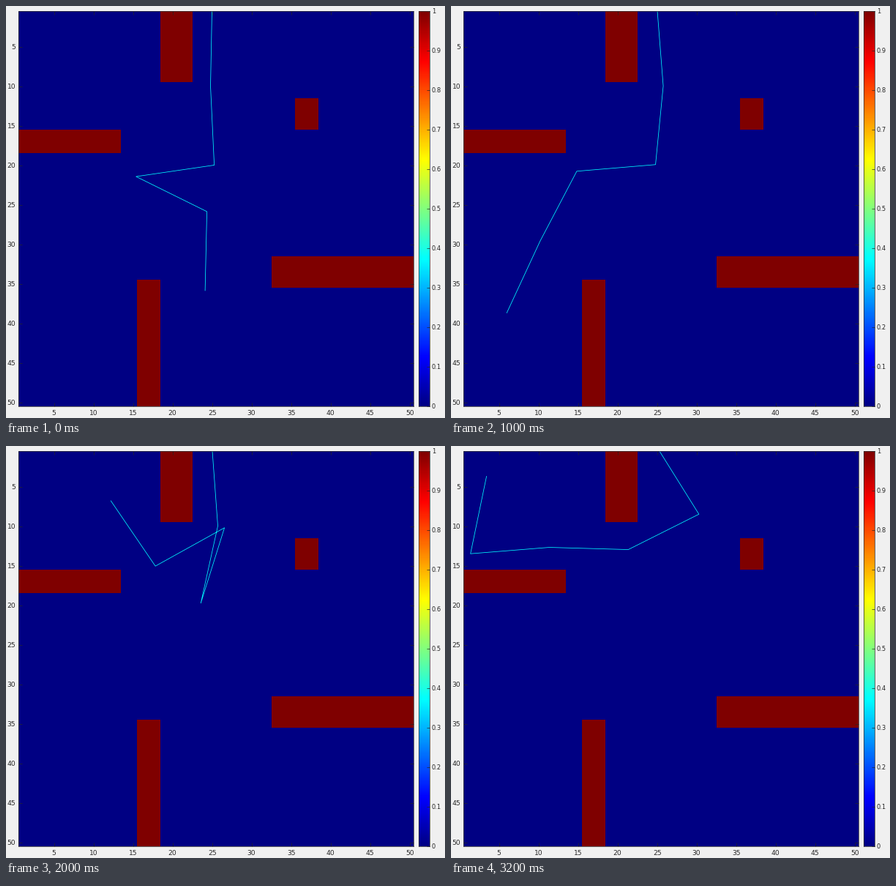
Recreate the animation shown at these times as a matplotlib script. Size 600 by 563 pixels, loop 4.8 s.

```python
import numpy as np
import matplotlib.pyplot as plt
from matplotlib.animation import FuncAnimation
from matplotlib.colors import ListedColormap

W, H, DPI = 600, 563, 100
FRAMES, INTERVAL = 48, 100
INK = "#262626"
LINK, BASE = 10, (25, 0)
PAUSES = (7, 30)

# heading of each link, in degrees from straight down, at a given step
POSES = {
    0: (-1.1, 2.7, -81.7, 63.7, -1.3),
    4: (60.9, -13.4, -89.5, 15.8, -10.7),
    9: (4.5, -5.6, -85.2, -27.7, -24.9),
    17: (25.5, 8.5, -206, -33.2, -135.6),
    22: (-7.8, -24.2, -192.6, -76.6, -151.4),
    26: (-7.5, -27.6, -124.8, -104.4, -208.8),
    30: (32, -63.4, -91.6, -85.4, -191.7),
}
STEPS = list(POSES)

# first column, last column, first row, last row
WALLS = [(19, 22, 1, 9), (1, 13, 16, 18), (36, 38, 12, 15),
         (33, 50, 32, 35), (16, 18, 35, 50)]


def jet(n=256):
    x = np.arange(1, n + 1) / n
    return np.clip([1.5 - abs(4 * x - c) for c in (3, 2, 1)], 0, 1).T


def pixel_axes(left, top, width, height):
    ax = fig.add_axes([left / W, 1 - (top + height) / H, width / W, height / H])
    for spine in ax.spines.values():
        spine.set(color=INK, linewidth=0.5)
    return ax


def ease_out(t):
    return 1 - (1 - t) ** 2


def headings(frame):
    step = min(frame - sum(frame >= p for p in PAUSES), STEPS[-1])
    i = min(np.searchsorted(STEPS, step, side="right"), len(STEPS) - 1)
    start, end = STEPS[i - 1], STEPS[i]
    a, b = np.radians(POSES[start]), np.radians(POSES[end])
    return a + (b - a) * ease_out((step - start) / (end - start))


def arm(frame):
    angles = headings(frame)
    x = BASE[0] + LINK * np.cumsum(np.r_[0, np.sin(angles)])
    y = BASE[1] + LINK * np.cumsum(np.r_[0, np.cos(angles)])
    return x, y


plt.rcParams["font.family"] = "DejaVu Sans"
fig = plt.figure(figsize=(W / DPI, H / DPI), dpi=DPI, facecolor="#f0f0f0")
cmap = ListedColormap(jet())

grid = np.zeros((50, 50))
for c0, c1, r0, r1 in WALLS:
    grid[r0 - 1:r1, c0 - 1:c1] = 1

ax = pixel_axes(17, 7, 540, 540)
ax.imshow(grid, cmap=cmap, vmin=0, vmax=1, extent=(0.5, 50.5, 50.5, 0.5),
          aspect="auto", interpolation="nearest")
line, = ax.plot([], [], color="cyan", lw=0.55)
ticks = range(5, 51, 5)
ax.set(xlim=(0.5, 50.5), ylim=(50.5, 0.5), xticks=ticks, yticks=ticks)
ax.tick_params(direction="in", top=True, right=True, length=3.9, width=0.5,
               color=INK, labelcolor=INK, labelsize=6.6)
ax.tick_params(axis="x", pad=3.4)
ax.tick_params(axis="y", pad=2.7)

bar = pixel_axes(564, 7, 15, 540)
bar.imshow(np.linspace(0, 1, 256)[:, None], cmap=cmap, origin="lower",
           extent=(0, 1, 0, 1), aspect="auto", interpolation="nearest")
levels = np.arange(11) / 10
bar.set_xticks([])
bar.set_yticks(levels, [f"{v:g}" for v in levels])
bar.yaxis.tick_right()
bar.tick_params(axis="y", direction="in", length=3, width=0.5, pad=2,
                color=INK, labelcolor=INK, labelsize=6.0)


def draw(frame):
    line.set_data(*arm(frame))
    return line,


anim = FuncAnimation(fig, draw, frames=FRAMES, interval=INTERVAL,
                     repeat=True, repeat_delay=0)
plt.show()
```
